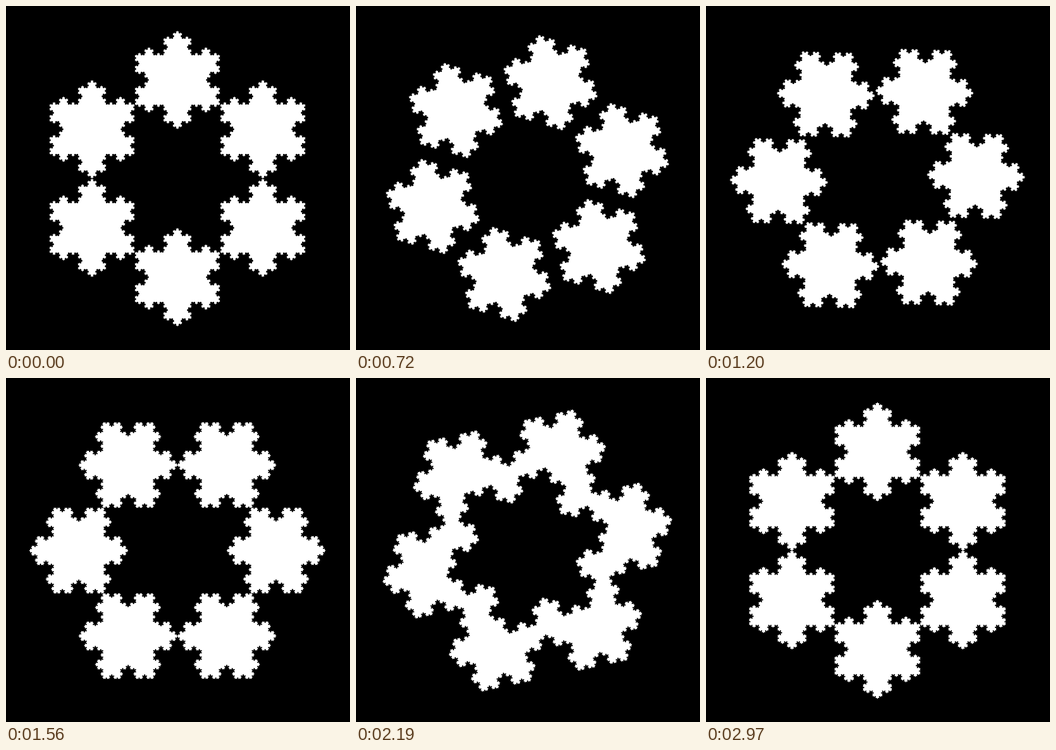
An HTML page with a canvas that plays this animation: 600x600 px, repeating every 3000 ms.

```html
<!DOCTYPE html>
<html lang="en">
<head>
<meta charset="utf-8">
<title>Koch snowflakes</title>
<style>
  html, body { margin: 0; width: 100%; height: 100%; overflow: hidden; background: #000; }
  canvas { display: block; width: 600px; height: 600px; }
</style>
</head>
<body>
<canvas id="stage" width="600" height="600"></canvas>
<script>
const ctx = document.getElementById('stage').getContext('2d');
const LOOP = 3000, HALF = LOOP / 2, STEP = 30;
const CX = 299, CY = 301;
const SMALL = 86, MIDDLE = SMALL * Math.sqrt(3), LARGE = SMALL * 3;
const WHITE = '#fff', BLACK = '#000';
const rad = deg => deg * Math.PI / 180;

// Koch snowflake with one tip pointing up
function snowflake(radius, depth) {
  const path = new Path2D();
  const edge = (x, y, dx, dy, n) => {
    if (n === 0) {
      path.lineTo(x + dx, y + dy);
      return;
    }
    const ax = dx / 3, ay = dy / 3, s = Math.sqrt(3) / 2;
    const bx = ax / 2 + ay * s, by = ay / 2 - ax * s;
    const cx = ax - bx, cy = ay - by;
    edge(x, y, ax, ay, n - 1);
    edge(x + ax, y + ay, bx, by, n - 1);
    edge(x + ax + bx, y + ay + by, cx, cy, n - 1);
    edge(x + 2 * ax, y + 2 * ay, ax, ay, n - 1);
  };
  const corner = i => [radius * Math.sin(rad(120 * i)), -radius * Math.cos(rad(120 * i))];
  path.moveTo(...corner(0));
  for (let i = 0; i < 3; i++) {
    const [x, y] = corner(i), [u, v] = corner(i + 1);
    edge(x, y, u - x, v - y, depth);
  }
  path.closePath();
  return path;
}

const small = snowflake(SMALL, 4);
const middle = snowflake(MIDDLE, 5);
const large = snowflake(LARGE, 5);

function ease(p) {
  const g = 2.5;
  return p < 0.5 ? 0.5 * (2 * p) ** g : 1 - 0.5 * (2 - 2 * p) ** g;
}

function drawFlake(path, color, x, y, deg, outline = 0) {
  ctx.save();
  ctx.translate(x, y);
  ctx.rotate(rad(deg));
  ctx.fillStyle = ctx.strokeStyle = color;
  ctx.fill(path);
  if (outline) {
    ctx.lineWidth = outline;
    ctx.lineJoin = 'round';
    ctx.stroke(path);
  }
  ctx.restore();
}

function draw(time) {
  const t = Math.floor((time % LOOP) / STEP) * STEP;
  const turn = 30 * ease((t % HALF) / HALF);
  ctx.fillStyle = BLACK;
  ctx.fillRect(0, 0, 600, 600);
  if (t < HALF) {
    // Six flakes orbit one way and spin the other
    for (let i = 0; i < 6; i++) {
      const a = rad(60 * i + turn);
      drawFlake(small, WHITE, CX + 2 * SMALL * Math.sin(a), CY - 2 * SMALL * Math.cos(a), -turn);
    }
  } else {
    // The same outline as a large flake with a counter-rotating hole
    drawFlake(large, WHITE, CX, CY, 30 - turn, 1);
    drawFlake(middle, BLACK, CX, CY, turn);
  }
}

function tick() {
  draw(performance.now());
  requestAnimationFrame(tick);
}
tick();
</script>
</body>
</html>
```
